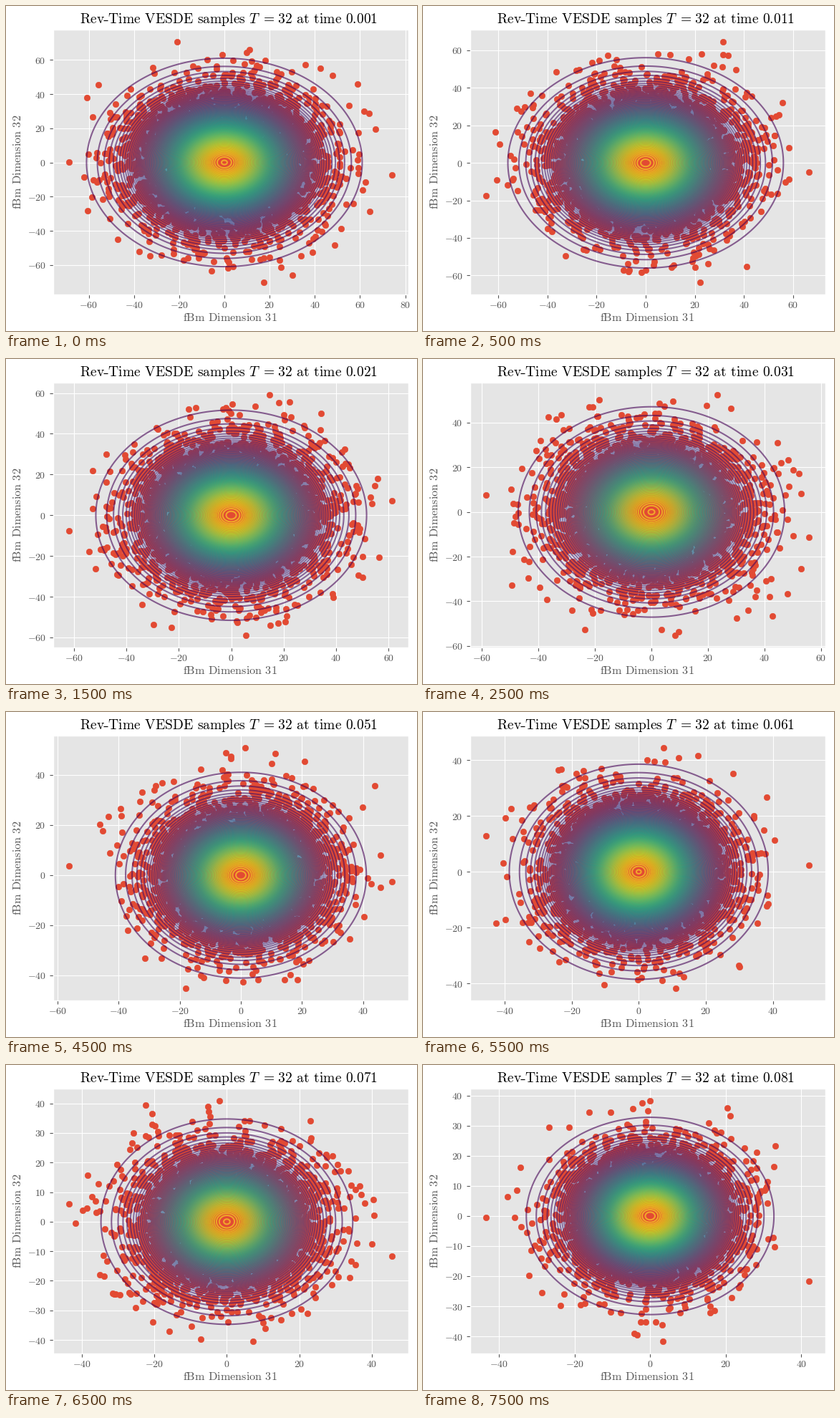
Recreate the animation shown at these times as a matplotlib script. Size 574 by 454 pixels, loop 8000 ms.

```python
import numpy as np
import matplotlib.pyplot as plt
from matplotlib.animation import FuncAnimation
from matplotlib.collections import LineCollection
from matplotlib.lines import Line2D
from matplotlib.ticker import FuncFormatter

plt.style.use("ggplot")
plt.rcParams["mathtext.fontset"] = "cm"

W, H, DPI = 574, 454, 100
LEFT, TOP, AX_W, AX_H = 65.5, 33, 496, 369.6
SAMPLES = 5000
RED, GRAY = "#E24A33", "#555555"
GAP = r"\hspace{0.38}"  # one roman word space
STEPS = np.array([1, 1.5, 2, 2.5, 3, 4, 5, 6, 8, 10])
THETA = np.linspace(0, 2 * np.pi, 241)
RING = np.column_stack([np.cos(THETA), np.sin(THETA)])

# Spread of the cloud and the view (x low, x high, y low, y high) per step.
STATES = [
    (20.13, -75.84, 81.25, -77.1, 77.7),
    (18.65, -71.5, 73, -70, 71),
    (17.21, -67.96, 67.4, -64.8, 65.1),
    (15.95, -64.2, 61.4, -60.56, 57.9),
    (14.85, -60, 58, -54, 55),
    (13.8, -61.5, 54.7, -49.9, 55.7),
    (12.734, -50.3, 55.5, -46.05, 48.8),
    (11.8, -48, 50, -44.5, 45),
    (10.943, -47.7, 46.3, -45.6, 42.3),
]


def roman(text):
    return GAP.join(r"\mathrm{%s}" % word for word in text.split())


def level_count(sigma):
    """Peak density in units of a round contour step (about 100 levels)."""
    peak = 1 / (2 * np.pi * sigma**2)
    raw = peak / 101
    base = 10 ** np.floor(np.log10(raw))
    return peak / (base * STEPS[STEPS >= raw / base][0])


def contours(sigma):
    """Rings of equal Gaussian density with their colours."""
    n = level_count(sigma)
    k = np.arange(1, int(n) + 1)
    radii = sigma * np.sqrt(2 * np.log(n / k))
    colors = plt.cm.viridis((k - 1) / (k[-1] - 1), alpha=0.6)
    return [r * RING for r in radii], colors


def cloud(sigma, low, high, seed):
    """Gaussian samples whose extremes leave a 5% margin in the view."""
    margin = 0.05 / 1.1 * (high - low)
    low, high = low + margin, high - margin
    points = np.random.default_rng(seed).normal(0, sigma, (SAMPLES, 2))
    points = points[((points > low) & (points < high)).all(axis=1)]
    for axis in range(2):
        points[points[:, axis].argmin(), axis] = low[axis]
        points[points[:, axis].argmax(), axis] = high[axis]
    return points


def make_scene(step):
    sigma, x0, x1, y0, y1 = STATES[step]
    rings, colors = contours(sigma)
    points = cloud(sigma, np.array([x0, y0]), np.array([x1, y1]), 40 + step)
    return dict(points=points, rings=rings, colors=colors,
                xlim=(x0, x1), ylim=(y0, y1))


scenes = [make_scene(step) for step in range(len(STATES))]

fig = plt.figure(figsize=(W / DPI, H / DPI), dpi=DPI)
ax = fig.add_axes([LEFT / W, 1 - (TOP + AX_H) / H, AX_W / W, AX_H / H])
ax.tick_params(axis="x", pad=2.2)
for axis in (ax.xaxis, ax.yaxis):
    axis.set_major_formatter(FuncFormatter(lambda v, _: f"${int(round(v))}$"))


def label(x, y, text, **style):
    return fig.text(x / W, 1 - y / H, text, va="baseline", **style)


axis_style = dict(ha="center", color=GRAY, fontsize=11.65)
label(313, 440.3, f"${roman('fBm Dimension 31')}$", **axis_style)
label(21, 217.8, f"${roman('fBm Dimension 32')}$", rotation=90,
      rotation_mode="anchor", **axis_style)
title = label(102.8, 24, "", ha="left", color="black", fontsize=14.05)
# Math text turns "-" into a minus sign, so the hyphen is a short rule.
hyphen_y = 1 - 19.8 / H
fig.add_artist(Line2D([136.4 / W, 141.5 / W], [hyphen_y, hyphen_y],
                      color="black", lw=0.85, solid_capstyle="butt"))

dots = ax.scatter([], [], color=RED, zorder=1)
rings = LineCollection([], linewidths=1.5, zorder=2)
ax.add_collection(rings, autolim=False)


def title_text(time):
    return ("$" + roman("Rev") + GAP + roman("Time VESDE samples") + GAP
            + r"T\hspace{0.27}=\hspace{0.117}32" + GAP
            + roman(f"at time {time:.3f}") + "$")


def update(frame):
    step = (frame + 1) // 2
    scene = scenes[step]
    dots.set_offsets(scene["points"])
    rings.set_segments(scene["rings"])
    rings.set_color(scene["colors"])
    ax.set_xlim(scene["xlim"])
    ax.set_ylim(scene["ylim"])
    title.set_text(title_text(0.001 + 0.01 * step))
    return dots, rings, title


anim = FuncAnimation(fig, update, frames=16, interval=500, repeat=True,
                     init_func=lambda: update(0))
plt.show()
```
